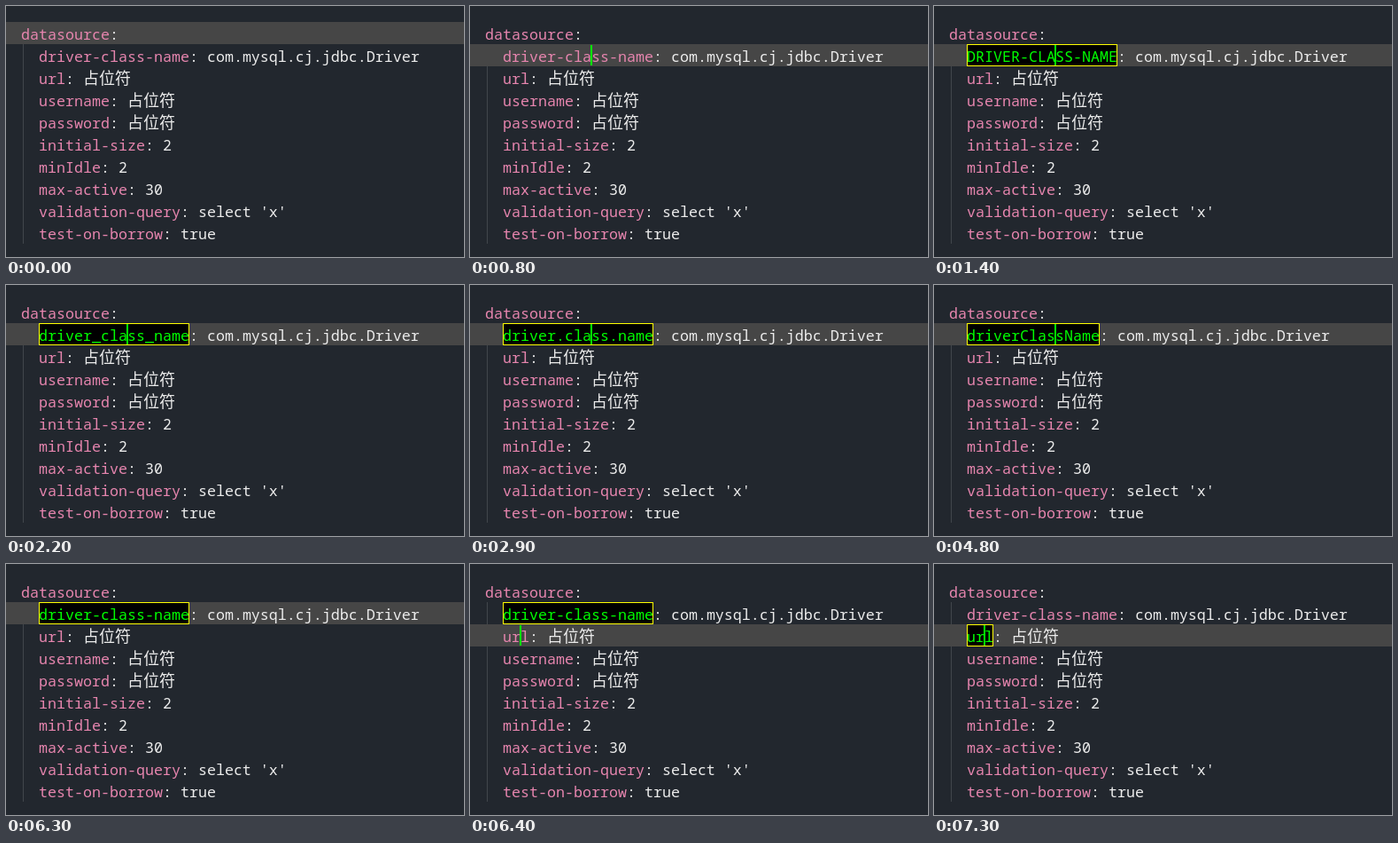
Write an HTML page that moves like this. It is 517 px wide and 283 px high and loops after 8 s.

```html
<!DOCTYPE html>
<html lang="en">
<head>
<meta charset="utf-8">
<style>
  html, body { margin: 0; height: 100%; overflow: hidden; background: #22272e; }
  svg { display: block; width: 517px; height: 283px; }
  text { font: 16.667px "Noto Sans Mono", "DejaVu Sans Mono", monospace; white-space: pre; fill: #ececec; }
  .key { fill: #e685ae; }
  .boxed { fill: #00ff00; }
  .cjk { font: 18px "Noto Sans CJK SC", "Noto Sans CJK", sans-serif; }
</style>
</head>
<body>
<svg id="stage" viewBox="0 0 517 283"></svg>
<script>
const LOOP = 8000, ROW = 25, TOP = 18, CHAR = 10, INDENT = 37;
const stage = document.getElementById('stage');

const lines = [
  ['datasource', ''],
  ['driver-class-name', 'com.mysql.cj.jdbc.Driver'],
  ['url', '占位符'],
  ['username', '占位符'],
  ['password', '占位符'],
  ['initial-size', '2'],
  ['minIdle', '2'],
  ['max-active', '30'],
  ['validation-query', "select 'x'"],
  ['test-on-borrow', 'true']
];

// start time, current row, caret visible, boxed row (0 = none), boxed word
const steps = [
  [0, 0, false, 0],
  [800, 1, true, 0],
  [1100, 1, false, 1, 'driver-class-name'],
  [1400, 1, true, 1, 'DRIVER-CLASS-NAME'],
  [2200, 1, true, 1, 'driver_class_name'],
  [2500, 1, true, 1, 'DRIVER_CLASS_NAME'],
  [2900, 1, true, 1, 'driver.class.name'],
  [3500, 1, true, 1, 'driver class name'],
  [3900, 1, true, 1, 'Driver Class Name'],
  [4400, 1, true, 1, 'DriverClassName'],
  [4800, 1, true, 1, 'driverClassName'],
  [5400, 1, true, 1, 'driver-class-name'],
  [6300, 1, false, 1, 'driver-class-name'],
  [6400, 2, true, 1, 'driver-class-name'],
  [6600, 2, false, 2, 'url'],
  [6700, 2, true, 2, 'Url'],
  [7000, 2, true, 2, 'URL'],
  [7300, 2, true, 2, 'url']
];
const caretColumn = [0, 10, 2];

function add(parent, tag, attrs, text = '') {
  const el = document.createElementNS('http://www.w3.org/2000/svg', tag);
  set(el, attrs);
  el.textContent = text;
  return parent.appendChild(el);
}

function set(el, attrs) {
  for (const name in attrs) el.setAttribute(name, attrs[name]);
}

const rowTop = row => TOP + row * ROW;

add(stage, 'rect', { x: 19, y: rowTop(1), width: 1, height: 9 * ROW, fill: '#41464c' });
const highlight = add(stage, 'rect', { width: 517, height: ROW, fill: '#464646' });
const box = add(stage, 'rect', { x: INDENT + 0.5, height: ROW - 1, fill: '#000', stroke: '#ffff00' });

const keys = lines.map(([key, value], row) => {
  const line = add(stage, 'text', { x: row ? INDENT : 17, y: rowTop(row) + 20 });
  const keySpan = add(line, 'tspan', { class: 'key' }, key);
  add(line, 'tspan', {}, ': ');
  add(line, 'tspan', { class: value > '~' ? 'cjk' : '' }, value);
  return keySpan;
});
const caret = add(stage, 'rect', { width: 2, height: ROW - 2, fill: '#00ff00' });

let shown;
function draw(now) {
  const time = now % LOOP;
  const step = steps.findLast(([start]) => start <= time);
  if (step !== shown) {
    shown = step;
    const [, row, caretOn, boxRow, word] = step;
    set(highlight, { y: rowTop(row) });
    set(box, {
      y: rowTop(boxRow) + 0.5,
      width: boxRow ? word.length * CHAR - 1 : 0,
      visibility: boxRow ? 'visible' : 'hidden'
    });
    set(caret, {
      x: INDENT + caretColumn[row] * CHAR - 1,
      y: rowTop(row) + 1,
      visibility: caretOn ? 'visible' : 'hidden'
    });
    keys.forEach((key, i) => {
      const boxed = boxRow > 0 && i === boxRow;
      key.textContent = boxed ? word : lines[i][0];
      set(key, { class: boxed ? 'boxed' : 'key' });
    });
  }
  requestAnimationFrame(() => draw(performance.now()));
}
draw(performance.now());
</script>
</body>
</html>
```
